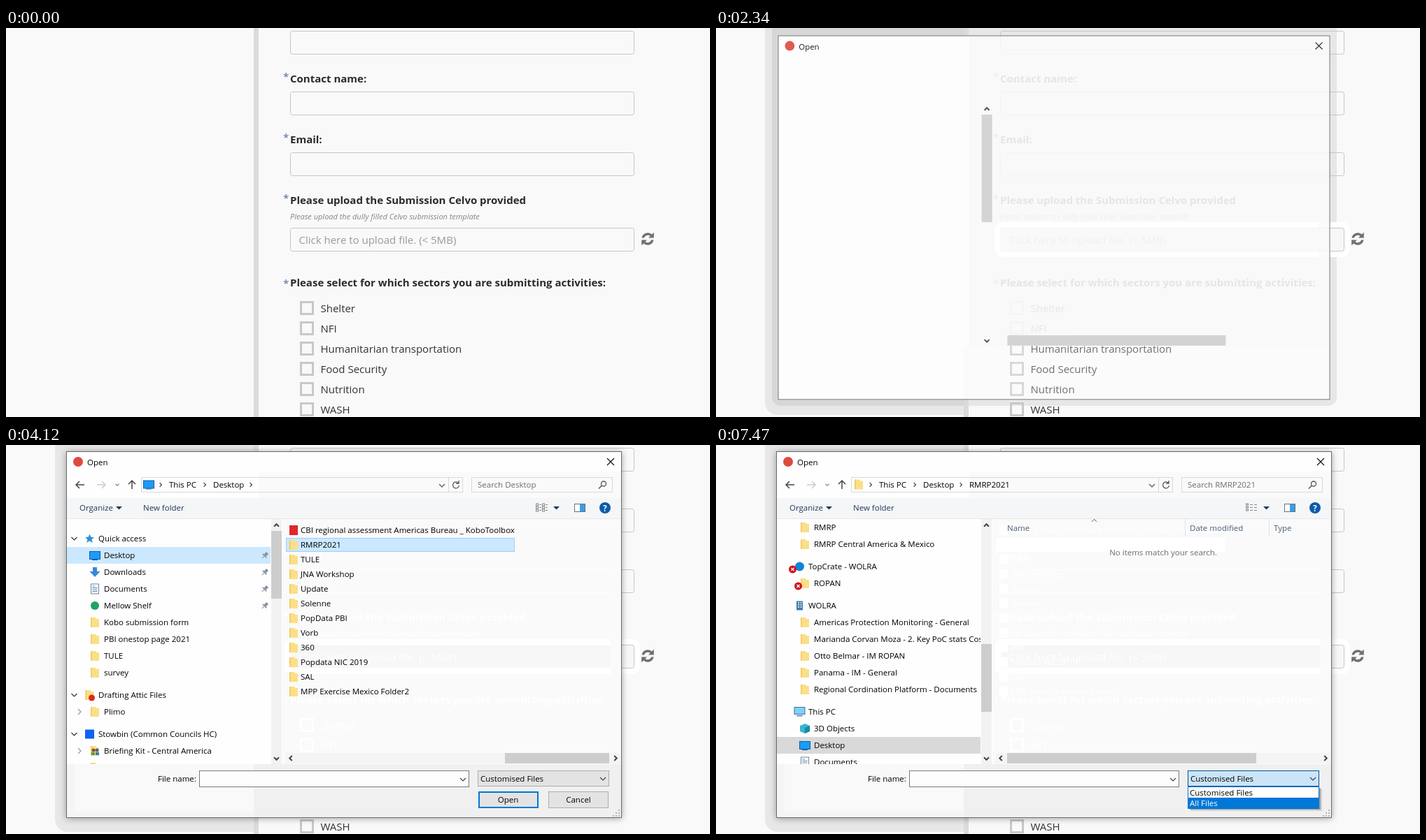
Recreate the animation shown at these times as an HTML page. Size 1006 px wide and 557 px high, loop 8 s.

```html
<!DOCTYPE html>
<html lang="en">
<head>
<meta charset="utf-8">
<title>Upload dialog</title>
<style>
html, body { margin: 0; width: 100%; height: 100%; overflow: hidden; background: #f9f9f9; }
svg { display: block; }
text { font-family: "Open Sans", "Noto Sans", sans-serif; font-size: 11.5px; white-space: pre; }
.form text { font-size: 15px; }
.form .label { font-weight: 700; }
.form .hint { font-size: 11px; font-style: italic; }
.frame { filter: drop-shadow(0 1px 5px rgba(0, 0, 0, .35)); }
</style>
</head>
<body>
<svg id="stage" width="1006" height="557" viewBox="0 0 1006 557"></svg>
<script>
const LOOP = 8000;
const stage = document.getElementById('stage');

// Drawing helpers, each returning SVG markup
const escapeText = s => s.replace(/&/g, '&amp;').replace(/</g, '&lt;');
const text = (x, y, s, fill = '#000', extra = '') =>
  `<text x="${x}" y="${y}" fill="${fill}" ${extra}>${escapeText(s)}</text>`;
const rect = (x, y, w, h, fill, stroke = 'none', extra = '') =>
  `<rect x="${x}" y="${y}" width="${w}" height="${h}" fill="${fill}" stroke="${stroke}" ${extra}/>`;
const line = (d, stroke = '#444', width = 1) =>
  `<path d="${d}" fill="none" stroke="${stroke}" stroke-width="${width}"/>`;
const shape = (d, fill) => `<path d="${d}" fill="${fill}"/>`;
const dot = (x, y, r, fill) => `<circle cx="${x}" cy="${y}" r="${r}" fill="${fill}"/>`;
const group = (transform, s) => `<g transform="${transform}">${s}</g>`;
const fade = (opacity, s) => `<g opacity="${opacity.toFixed(3)}">${s}</g>`;
const clip = (x, y, w, h, s) =>
  `<svg x="${x}" y="${y}" width="${w}" height="${h}" viewBox="${x} ${y} ${w} ${h}">${s}</svg>`;
const chevron = (x, y, dir, color = '#444', size = 3.5, width = 1.2) => {
  const turn = { right: 0, down: 90, left: 180, up: 270 }[dir];
  return group(`translate(${x} ${y}) rotate(${turn})`,
    line(`M${-size / 2} ${-size}L${size / 2} 0L${-size / 2} ${size}`, color, width));
};
const arrow = (x, y, turn, color) => group(`translate(${x} ${y}) rotate(${turn})`,
  line('M-6 0H6M-1 -5L-6 0L-1 5', color, 1.5));
const progress = (t, from, to) => Math.min(1, Math.max(0, (t - from) / (to - from)));

// Web form behind the dialog; a ghost copy is all white
function form(t, ghost) {
  const ink = c => ghost ? '#fff' : c;
  const star = y => text(396, y, '*', ink('#4f6b95'));
  const field = (y, fill = 'none') => rect(406.5, y, 491, 33, fill, ink('#c6c6c6'), 'rx="3"');
  const label = (y, s) => text(406, y, s, ink('#2b2b2b'), 'class="label"');
  const ring = 8 * Math.min(1, Math.max(0, Math.floor((t - 1410) / 80) + 1) / 3);
  const half = shape('M908.5 300.5A8.6 8.6 0 0 1 922.8 295.6L925.8 292.8V300.5H918L920.6 298A5.3 5.3 0 0 0 912 300.5Z', '#707070');
  const sectors = ['Shelter', 'NFI', 'Humanitarian transportation', 'Food Security', 'Nutrition', 'WASH'];
  return '<g class="form">' +
    (ghost ? '' : rect(354, 0, 7, 557, '#dbdbdb')) +
    field(4.5) + star(75) + label(78, 'Contact name:') + field(91.5) +
    star(162) + label(165, 'Email:') + field(178.5) +
    star(249) + label(252, 'Please upload the Submission Celvo provided') +
    text(406, 274, 'Please upload the dully filled Celvo submission template', ink('#858585'), 'class="hint"') +
    (ring > 0 ? rect(406 - ring, 286 - ring, 492 + 2 * ring, 34 + 2 * ring, '#fff', 'none', `rx="${ring + 3}"`) : '') +
    field(286.5, t >= 870 ? '#f7f7f7' : '#f9f9f9') +
    text(418.5, 309, 'Click here to upload file. (< 5MB)', ink('#999')) +
    (ghost ? '' : half + group('rotate(180 917 302)', half)) +
    star(371) + label(370, 'Please select for which sectors you are submitting activities:') +
    sectors.map((s, i) =>
      rect(421.5, 392.5 + 29 * i, 17, 17, 'none', ink('#c8c8c8'), 'stroke-width="3"') +
      text(449.5, 407 + 29 * i, s, ink('#333'))).join('') + '</g>';
}

// Icons are centred on the origin
const folder = shape('M-6-7H1L2.5-5H6V7H-6Z', '#fbdf88') + shape('M-6-7H-4.5V7H-6Z', '#f0c75e');
const screen = rect(-7.5, -5.5, 15, 11, '#1c9cf6', '#0a5da8') + shape('M-4 6H4V7H-4Z', '#0a5da8');
const icons = {
  folder, screen,
  star: shape('M0-6.5L2-2H6.5L3 1.2L4.2 6L0 3.3L-4.2 6L-3 1.2L-6.5-2H-2Z', '#2b8fdc'),
  down: shape('M-3-7H3V-1H7.5L0 7L-7.5-1H-3Z', '#3a87d6'),
  doc: rect(-5.5, -7, 11, 14, '#fff', '#77838f') + line('M-3.5-4H0M-3.5-1.5H3.5M-3.5 1H3.5M-3.5 3.5H3.5', '#4b83b8'),
  green: dot(0, 0, 6, '#1fa463'),
  blueSquare: rect(-6.5, -6.5, 13, 13, '#0d63f2'),
  blueDot: dot(0, 0, 6.5, '#1283d8'),
  redSquare: rect(-6, -7, 12, 14, '#e0272d'),
  artFolder: folder + dot(3, 4, 4.5, '#dc2a1c'),
  people: folder + dot(-2, -1, 2.5, '#7a5638') + dot(3, -1, 2.5, '#496a87') + rect(-5, 2, 5, 4, '#5f9a54') + rect(1, 2, 5, 4, '#447ba5'),
  building: rect(-4.5, -6.5, 9, 13, '#3b7fae') + line('M-2.5-4H-.5M1-4H3M-2.5-1H-.5M1-1H3M-2.5 2H-.5M1 2H3', '#fff', 1.5),
  pc: rect(-7.5, -6.5, 15, 10, '#7fd0f8', '#3f7598') + shape('M-4 5H4V6.5H-4Z', '#557d95'),
  cube: shape('M-7-4L0-7L7-4V4L0 7L-7 4Z', '#35b6cf') + shape('M0-1L7-4V4L0 7Z', '#168ba5')
};
const icon = (name, x, y) => group(`translate(${x} ${y})`, icons[name]);

// Navigation tree entries: depth, icon, name
const topTree = [
  [1, 'star', 'Quick access'], [2, 'screen', 'Desktop'], [2, 'down', 'Downloads'],
  [2, 'doc', 'Documents'], [2, 'green', 'Mellow Shelf'], [2, 'folder', 'Kobo submission form'],
  [2, 'folder', 'PBI onestop page 2021'], [2, 'folder', 'TULE'], [2, 'folder', 'survey'],
  [1, 'artFolder', 'Drafting Attic Files'], [2, 'folder', 'Plimo'],
  [1, 'blueSquare', 'Stowbin (Common Councils HC)'], [2, 'people', 'Briefing Kit - Central America'], [2, 'folder', '']
];
const lowerTree = [
  [2, 'folder', 'RMRP'], [2, 'folder', 'RMRP Central America & Mexico'],
  [1, 'blueDot', 'TopCrate - WOLRA'], [2, 'folder', 'ROPAN'],
  [1, 'building', 'WOLRA'], [2, 'folder', 'Americas Protection Monitoring - General'],
  [2, 'folder', 'Marianda Corvan Moza - 2. Key PoC stats Costs'], [2, 'folder', 'Otto Belmar - IM ROPAN'],
  [2, 'folder', 'Panama - IM - General'], [2, 'folder', 'Regional Cordination Platform - Documents'],
  [1, 'pc', 'This PC'], [2, 'cube', '3D Objects'], [2, 'screen', 'Desktop'], [2, 'doc', 'Documents']
];
const files = ['CBI regional assessment Americas Bureau _ KoboToolbox', 'RMRP2021', 'TULE', 'JNA Workshop',
  'Update', 'Solenne', 'PopData PBI', 'Vorb', '360', 'Popdata NIC 2019', 'SAL', 'MPP Exercise Mexico Folder2'];

const pin = y => group(`translate(370 ${y}) rotate(45)`,
  rect(-2, -5, 4, 5, '#8593a0') + rect(-4, 0, 8, 1.5, '#8593a0') + line('M0 1V6', '#8593a0'));

function tree(t) {
  const lower = t >= 4590;
  const chevrons = lower ? (1 - progress(t, 4770, 5450)) ** 2 : progress(t, 2800, 3190);
  const highlight = lower ? { 12: '#d9d9d9' }
    : t >= 4290 ? { 1: '#d9d9d9' }
    : t >= 3650 ? { 1: '#cce8ff' }
    : { 0: '#d9d9d9', 2: t >= 2800 ? '#e5f3ff' : 'none' };
  let y = lower ? 94 : 110;
  const rows = (lower ? lowerTree : topTree).map(([depth, kind, name], i) => {
    y += depth === 1 && i ? 32 : 24;
    const nested = depth === 2;
    const expandable = !nested || lower || i > 8;
    return (highlight[i] ? rect(87, y - 12, 291, 24, highlight[i]) : '') +
      (expandable ? fade(chevrons, chevron(nested ? 105 : 97.5, y, nested ? 'right' : 'down', nested ? '#999' : '#333', 4)) : '') +
      icon(kind, nested ? 127 : 119.5, y) + text(nested ? 140 : 132, y + 4, name) +
      (!lower && i > 0 && i < 5 ? pin(y) : '');
  }).join('');
  const badge = (x, by) => dot(x, by, 5.5, '#d0111b') + line(`M${x - 2} ${by - 2}l4 4m0-4l-4 4`, '#fff', 1.4);
  const badges = lower ? fade(progress(t, 4850, 5750), badge(109.5, 178) + badge(117.5, 202)) : '';
  return clip(87, 106, 291, 351, rect(87, 106, 291, 351, '#fefefe') + rows + badges);
}

const scrollbars = (top, height, left, width) =>
  rect(379, 106, 15, 351, '#f2f2f2') + rect(379, top, 15, height, '#cdcdcd') +
  chevron(386.5, 115, 'up', '#444', 3.5, 2) + chevron(386.5, 449, 'down', '#444', 3.5, 2) +
  rect(400, 441, 478, 15, '#f4f4f4') + rect(left, 441, width, 15, '#cdcdcd') +
  chevron(407, 448.5, 'left', '#444', 3.5, 2) + chevron(871, 448.5, 'right', '#444', 3.5, 2);

function fileList(color, selected) {
  return files.map((name, i) => {
    const y = 122 + 21 * i;
    return (i === 1 ? rect(400.5, 133.5, 326, 19, selected ? '#cce8ff' : color, selected ? '#99d1ff' : color) : '') +
      (selected ? icon(i ? 'folder' : 'redSquare', 411, y) : rect(405, y - 7, 12, 14, color)) +
      text(421, y + 4, name, color);
  }).join('');
}

function filePane(t) {
  const onDesktop = t >= 4120 && t < 4590, inside = t >= 4590;
  const columns = inside ? [['Date modified', 677, 670.5], ['Type', 797, 790.5]]
    : [['Status', 677, 670.5], ['Date modified', 757, 750.5], ['T', 877, 870.5]];
  const header = text(416, 123, 'Name', '#4c607a') + chevron(540.5, 108, 'up', '#555', 3.5, 1) +
    columns.map(([name, x, edge]) => line(`M${edge} 106V131`, '#e2e2e2') + text(x, 123, name, '#4c607a')).join('');
  const emptyNote = t >= 4680 || (t >= 2880 && !inside)
    ? text(639, 158, 'No items match your search.', '#6d6d6d', 'text-anchor="middle"') : '';
  return clip(395, 106, 484, 351, rect(395, 106, 484, 351, '#fafafa') +
    clip(397, 148, 467, 293, form(t, true)) +
    (inside ? fileList('#fff', false) : '') +
    (onDesktop ? fileList('#000', true) : header + emptyNote));
}

const titleBar = () => dot(103, 24, 7, '#dd4b3e') + text(116, 29, 'Open') + line('M859 19l10 10m0-10l-10 10', '#111', 1.2);

function addressBar(t) {
  const onDesktop = t >= 4120 && t < 4590, inside = t >= 4590;
  const crumbs = inside ? [['This PC', 233], ['Desktop', 296], ['RMRP2021', 362]]
    : onDesktop ? [['This PC', 233], ['Desktop', 296]]
    : [['IM', 233], ['RMRP 2021', 270], ['Planeacion', 352], ['Kobo submission form', 433]];
  const seps = inside || onDesktop ? [221, 284, 350] : [258, 340, 421];
  const place = inside ? 'RMRP2021' : onDesktop ? 'Desktop' : 'Kobo submission form';
  return arrow(106, 57, 0, t >= 4120 ? '#444' : '#ccc') + arrow(136, 57, 180, '#ccc') +
    chevron(159, 57, 'down', '#888', 2.5) + arrow(180, 57, 90, '#444') +
    rect(193.5, 46.5, 459, 21, 'none', '#d9d9d9') + line('M632.5 47V67', '#d9d9d9') +
    icon(onDesktop ? 'screen' : 'folder', 204, 56.5) +
    (inside || onDesktop ? '' : chevron(219, 57, 'left', '#333', 2.5, 1) + chevron(223, 57, 'left', '#333', 2.5, 1)) +
    seps.map(x => chevron(x, 57, 'right', '#333', 2.8, 1.1)).join('') +
    crumbs.map(([s, x]) => text(x, 61, s)).join('') +
    chevron(623, 58, 'down', '#666', 4, 1.5) +
    line('M646.5 54.5A4.5 4.5 0 1 0 647.5 58M647 51V55H643', '#555', 1.3) +
    rect(665.5, 46.5, 201, 21, 'none', '#d9d9d9') + text(674, 61, 'Search ' + place, '#6d6d6d') +
    '<circle cx="854" cy="55.5" r="3.5" fill="none" stroke="#555" stroke-width="1.3"/>' + line('M851.5 58L847 62.5', '#555', 1.6);
}

function toolbar(t) {
  const tiles = t >= 4120 && t < 4590;
  const view = [85, 89, 93].map(y => tiles
    ? rect(757.5, y - 1, 3, 3, 'none', '#888') + rect(766.5, y - 1, 3, 3, 'none', '#888') + line(`M762 ${y + .5}h3m6 0h3`, '#888')
    : rect(757.5, y - 1, 3, 2, 'none', '#888') + line(`M763 ${y + .5}h4m2 0h4`, '#888')).join('');
  return rect(87, 76, 792, 29, '#f5f6f7') + line('M87 105.5H879', '#e6e7e8') +
    text(105, 94, 'Organize', '#1e395b') + shape('M157 88H166L161.5 92.5Z', '#1e395b') +
    text(196, 94, 'New folder', '#1e395b') +
    (t >= 2800 ? view : '') + shape('M782 88H791L786.5 92.5Z', '#1e395b') +
    rect(812.5, 84.5, 15, 11, '#fff', '#5f7385') + rect(820, 85, 7, 10, '#3b9de6') +
    dot(856, 90, 8, '#0b5cad') + text(856, 94.5, '?', '#fff', 'text-anchor="middle" font-weight="700"');
}

function bottomBar(t) {
  const focused = t < 4120;
  const caret = (t >= 2960 && t < 3500) || (t >= 3650 && t < 4120);
  const open = t >= 6710, hover = t >= 5680;
  const choice = t >= 7470 ? 1 : 0;
  const unfolded = Math.min(33, 11 * (Math.floor((t - 6710) / 70) + 1));
  const options = () => clip(674, 489, 193, unfolded + 4,
    rect(678, 492, 188, 32, 'rgba(0,0,0,.12)') + rect(677, 491, 187, 31, 'rgba(0,0,0,.25)') +
    rect(674.5, 489.5, 187, 31, '#fff', '#0078d7') +
    rect(675, 490 + 15 * choice, 186, 15, '#0078d7') +
    ['Customised Files', 'All Files'].map((s, i) =>
      text(677, 502 + 15 * i, s, i === choice ? '#fff' : '#000')).join(''));
  const grip = [[875, 524], [871, 528], [875, 528], [867, 532], [871, 532], [875, 532]]
    .map(([x, y]) => rect(x, y - 2, 2, 2, '#b5b5b5')).join('');
  return rect(87, 457, 792, 76, '#f0f0f0') + rect(87, 457, 267, 76, '#f5f5f5') + rect(98, 457, 256, 68, '#f9f9f9') +
    text(217, 482, 'File name:') + rect(276.5, 466.5, 385, 23, '#fdfdfd', focused ? '#0078d7' : '#7a7a7a') +
    chevron(653, 479, 'down', '#444', 4) + (caret ? rect(280, 471, 1, 15, '#000') : '') +
    rect(674.5, 466.5, 187, 22, open ? '#cce4f7' : hover ? '#e5f1fb' : '#e3e3e3', open ? '#005499' : hover ? '#0078d7' : '#adadad') +
    text(678, 482, 'Customised Files') + chevron(853, 478, 'down', '#444', 4) +
    rect(676, 497, 84, 22, '#e3e3e3', '#0078d7', 'stroke-width="2"') + text(717.5, 512, 'Open', '#000', 'text-anchor="middle"') +
    rect(775.5, 496.5, 85, 23, '#e3e3e3', '#adadad') + text(818, 512, 'Cancel', '#000', 'text-anchor="middle"') +
    grip + (open ? options() : '');
}

// Wide shadow lying under the form, with the window's base while it opens
const shadow = opening =>
  clip(0, 0, 354, 557, rect(70, -30, 836, 584, 'rgba(0,0,0,.07)', 'none', 'rx="18"')) +
  (opening ? rect(80, -20, 807, 561, 'rgba(0,0,0,.07)', 'none', 'rx="12"') + rect(89, 11, 788, 521, '#fafafa') : '');

// The window fades and grows in three steps before its content shows
function openingWindow(t) {
  const step = t >= 2340 ? 2 : t >= 2270 ? 1 : 0;
  const scale = [.97, .985, .9937][step], cover = [.35, .65, .9][step];
  const body = rect(86.5, 9.5, 793, 447, `rgba(250,250,250,${cover})`) +
    rect(361, 456.5, 518, 77, `rgba(250,250,250,${cover / 3})`) +
    rect(87, 10, 274, 523, `rgba(254,254,254,${cover})`) +
    clip(395, 270, 469, 70, rect(402, 282, 500, 42, 'none', '#fff', 'stroke-width="8" rx="7"')) +
    rect(86.5, 9.5, 793, 524, 'none', '#777') +
    fade(cover, titleBar() + rect(379, 123, 15, 155, '#d0d0d0') + rect(416, 441, 314, 15, '#d0d0d0') +
      chevron(386.5, 115, 'up', '#444', 3.5, 2) + chevron(386.5, 449, 'down', '#444', 3.5, 2));
  return group(`translate(483 271.5) scale(${scale}) translate(-483 -271.5)`, body);
}

function dialog(t) {
  const thumb = t < 2800 ? [123, 155] : t < 4590 ? [123, 97] : [285, 97];
  const slider = t < 4120 ? [416, 314] : t < 4590 ? [713, 149] : [416, 356];
  return rect(86.5, 9.5, 793, 524, '#fefefe', '#6b6b6b', 'class="frame"') + rect(361, 38, 518, 38, '#fafafa') +
    titleBar() + addressBar(t) + toolbar(t) + tree(t) + filePane(t) +
    scrollbars(...thumb, ...slider) + bottomBar(t);
}

function scene(t) {
  const opening = t < 2420, visible = t >= 2190;
  return rect(0, 0, 1006, 557, '#f9f9f9') + (visible ? shadow(opening) : '') + form(t, false) +
    (visible ? opening ? openingWindow(t) : dialog(t) : '');
}

let shown = '';
function tick(now) {
  const next = scene(now % LOOP);
  if (next !== shown) stage.innerHTML = shown = next;
  requestAnimationFrame(tick);
}
tick(0);
</script>
</body>
</html>
```
